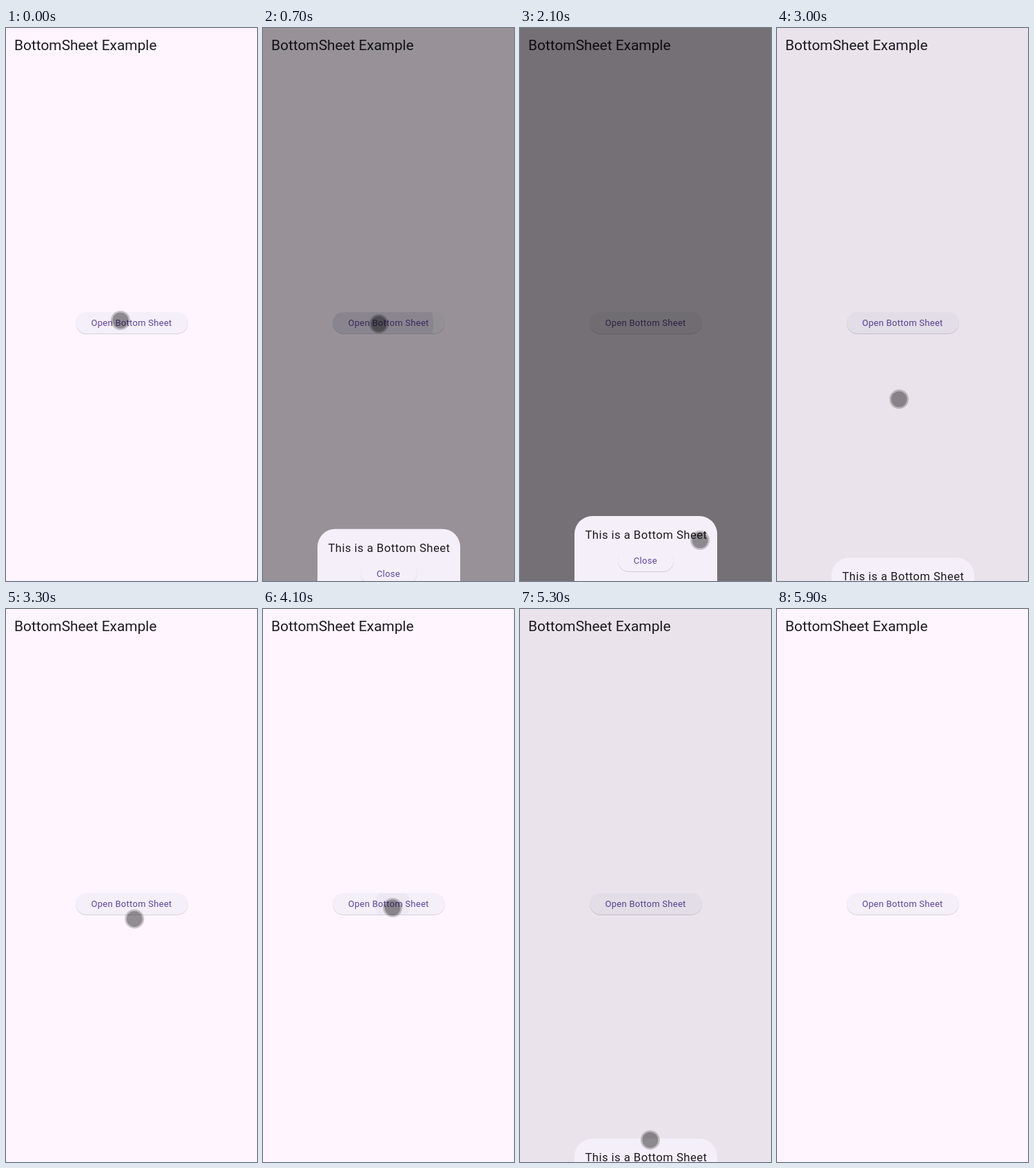
An HTML page for the animation above (7100 ms loop, 364 by 800 pixels).

```html
<!DOCTYPE html>
<html lang="en">
<head>
<meta charset="utf-8">
<title>BottomSheet Example</title>
<style>
html, body { margin: 0; width: 100%; height: 100%; overflow: hidden; background: #fef5ff; }
svg { display: block; width: 100vw; height: 100vh; }
text { font-family: Roboto, sans-serif; fill: #1d1b20; }
.label { font-size: 13px; letter-spacing: .28px; fill: #5c459c; }
.heading { font-size: 16.67px; letter-spacing: .46px; }
.title { font-size: 20.9px; }
.pill { fill: #f5eff9; }
.shade { fill: #000; opacity: .2; filter: url(#soft); }
.ripple { fill: #4a3f78; }
</style>
</head>
<body>
<svg viewBox="0 0 364 800" xmlns="http://www.w3.org/2000/svg">
  <defs>
    <filter id="soft" x="-5%" y="-20%" width="110%" height="140%"><feGaussianBlur stdDeviation=".7"/></filter>
    <clipPath id="openClip"><rect x="101" y="411" width="163" height="31.5" rx="15.75"/></clipPath>
    <clipPath id="closeClip"><rect x="142" y="49" width="81" height="31" rx="15.5"/></clipPath>
  </defs>
  <rect width="364" height="800" fill="#fef5ff"/>
  <text class="title" x="12" y="32">BottomSheet Example</text>

  <rect class="shade" x="101" y="411.7" width="163" height="31" rx="15.5"/>
  <rect class="pill" x="101" y="411" width="163" height="31" rx="15.5"/>
  <g clip-path="url(#openClip)"><circle id="openRipple" class="ripple" cy="427"/></g>
  <text class="label" x="123.5" y="431">Open Bottom Sheet</text>

  <rect id="scrim" width="364" height="800"/>

  <g id="sheet">
    <path d="M79 120V26a26 26 0 0 1 26-26H260a26 26 0 0 1 26 26V120Z" fill="#f5eff9"/>
    <text class="heading" x="94.4" y="33">This is a Bottom Sheet</text>
    <rect class="shade" x="142" y="49.7" width="81" height="31" rx="15.5"/>
    <rect class="pill" x="142" y="49" width="81" height="31" rx="15.5"/>
    <g clip-path="url(#closeClip)"><circle id="closeRipple" class="ripple" cy="64"/></g>
    <text class="label" x="164.8" y="69">Close</text>
  </g>

  <g id="cursor">
    <circle r="14" opacity=".2"/>
    <circle r="11.5" opacity=".28"/>
  </g>
</svg>
<script>
const LOOP = 7100, STEP = 100, LEAVE = 5900;
const ENTER = 250, EXIT = 200;
const SHEET_H = 94, SCRIM = .54, MID_X = 182.5;

// press and open: the button is held, then released; x: where it is touched
const visits = [
  { press: 0, open: 587, close: 2825, x: 165, closeX: 198 },
  { press: 3890, open: 4130, close: 5125, x: 188, closeX: 177 }
];

// key points of the touch: time, x, y
const path = [
  [0, 166, 423], [200, 168, 428], [700, 168, 428], [1300, 177, 757],
  [1500, 91, 752], [1700, 131, 748], [2100, 261, 741], [2200, 292, 751],
  [2500, 197, 770], [2800, 198, 770], [3000, 177, 537], [3400, 188, 432],
  [4100, 188, 432], [4300, 193, 517], [4600, 177, 769], [5200, 177, 771],
  [LEAVE, 390, 720]
];

const $ = id => document.getElementById(id);
const clamp = v => Math.min(1, Math.max(0, v));
const lerp = (a, b, f) => a + (b - a) * f;
const smooth = f => f * f * (3 - 2 * f);

function set(id, attrs) {
  for (const name in attrs) $(id).setAttribute(name, attrs[name]);
}

function bezier(x1, y1, x2, y2) {
  const at = (a, b, s) => 3 * (1 - s) * (1 - s) * s * a + 3 * (1 - s) * s * s * b + s ** 3;
  return x => {
    let lo = 0, hi = 1;
    for (let i = 0; i < 24; i++) {
      const mid = (lo + hi) / 2;
      if (at(x1, x2, mid) < x) lo = mid; else hi = mid;
    }
    return x <= 0 ? 0 : at(y1, y2, hi);
  };
}
const decelerate = bezier(0, 0, .2, 1);
const ease = bezier(.25, .1, .25, 1);

function touchAt(t) {
  const next = path.findIndex(p => p[0] > t);
  if (next < 0) return path[path.length - 1].slice(1);
  const [t0, x0, y0] = path[next - 1], [t1, x1, y1] = path[next];
  const f = smooth((t - t0) / (t1 - t0));
  return [lerp(x0, x1, f), lerp(y0, y1, f)];
}

// Swells while held, spreads on release, then fades out.
function ripple(id, t, press, release, x) {
  const spread = clamp((t - release) / 250);
  const fade = 1 - clamp((t - release - 200) / 200);
  set(id, {
    cx: lerp(x, MID_X, spread),
    r: t > press ? 29 * (1 - Math.exp((press - t) / 100)) + 100 * spread : 0,
    opacity: (.04 + .1 * spread) * fade
  });
}

function draw(t) {
  const visit = visits.findLast(v => t >= v.press);
  const open = clamp((t - visit.open) / ENTER) - clamp((t - visit.close) / EXIT);
  set("scrim", { opacity: SCRIM * ease(open) });
  set("sheet", { transform: `translate(0 ${800 - SHEET_H * decelerate(open)})` });
  ripple("openRipple", t, visit.press, visit.open, visit.x);
  ripple("closeRipple", t, visit.close, visit.close, visit.closeX);
  set("cursor", {
    transform: `translate(${touchAt(t)})`,
    visibility: t < LEAVE ? "visible" : "hidden"
  });
}

const start = performance.now();
function tick() {
  const t = (performance.now() - start) % LOOP;
  draw(Math.floor(t / STEP) * STEP);
  requestAnimationFrame(tick);
}
tick();
</script>
</body>
</html>
```
